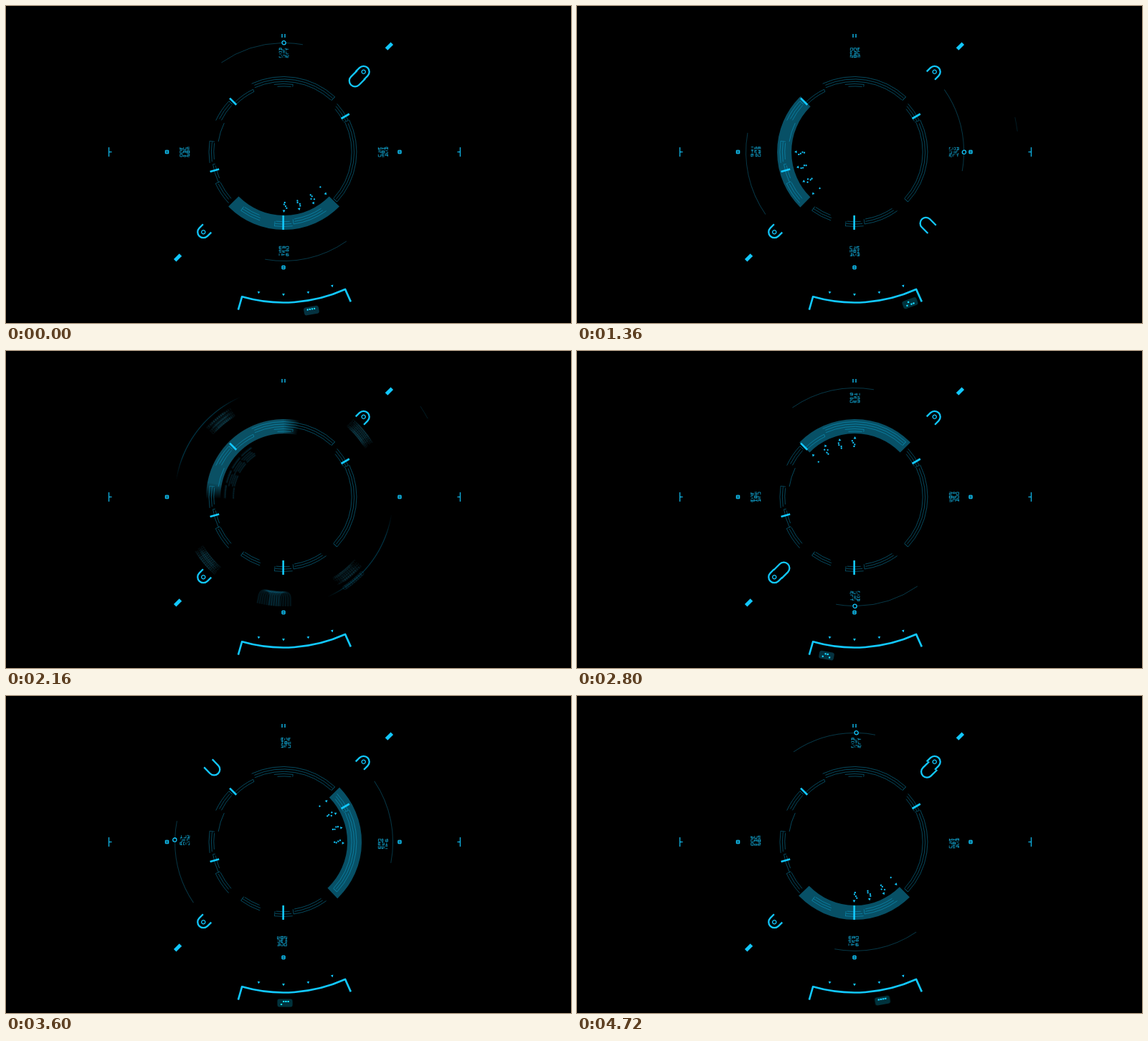
An HTML page with a canvas that plays this animation: 788 px wide and 442 px high, repeating every 4760 ms.

```html
<!DOCTYPE html>
<html lang="en">
<head>
<meta charset="utf-8">
<title>HUD dial</title>
<style>
  html, body { margin: 0; width: 100%; height: 100%; overflow: hidden; background: #000; }
  canvas { display: block; }
</style>
</head>
<body>
<canvas id="stage" width="788" height="442"></canvas>
<script>
const ctx = document.getElementById('stage').getContext('2d');
const CX = 387, CY = 203.5, LOOP = 4760, FRAME = 40, STEP = 1160;
const CYAN = '#12c8ff';
const SHUTTER = 24, SAMPLES = 10;
const SWING_START = 615, SWING_TIME = 750, HOP_START = 876;
const rad = deg => deg * Math.PI / 180;

function seeded(seed) {
  return () => {
    seed = (seed + 0x6d2b79f5) | 0;
    let v = Math.imul(seed ^ seed >>> 15, 1 | seed);
    v ^= v + Math.imul(v ^ v >>> 7, 61 | v);
    return ((v ^ v >>> 14) >>> 0) / 2 ** 32;
  };
}

// ---- timing ----

// Symmetric bezier ease with a slight wind-up and overshoot.
function swing(x) {
  if (x <= 0) return 0;
  if (x >= 1) return 1;
  const bez = (u, p) => 3 * p * u * (1 - u) ** 2 + 3 * (1 - p) * u * u * (1 - u) + u ** 3;
  let lo = 0, hi = 1;
  for (let i = 0; i < 24; i++) {
    const mid = (lo + hi) / 2;
    if (bez(mid, 0.75) < x) lo = mid; else hi = mid;
  }
  return bez(lo, -0.15);
}

function spring(ms) {
  return ms <= 0 ? 0 : 1 - Math.exp(-ms / 150) * Math.cos(ms * 2 * Math.PI / 290);
}

function rotation(t) {
  let turns = 0;
  for (let k = 0; k < 4; k++) turns += swing((t - k * STEP - SWING_START) / SWING_TIME);
  return turns * 90;
}

function badgeAngle(t) {
  const hop = k => 10 * spring(t - k * STEP - HOP_START);
  return t < 2000 ? 80 - hop(0) : 100 - hop(2) - hop(3);
}

// ---- drawing helpers, all relative to the dial centre ----

function arc(r, from, to) {
  ctx.beginPath();
  ctx.arc(0, 0, r, rad(from), rad(to));
  ctx.stroke();
}

function line(x1, y1, x2, y2) {
  ctx.beginPath();
  ctx.moveTo(x1, y1);
  ctx.lineTo(x2, y2);
  ctx.stroke();
}

function circle(x, y, r) {
  ctx.beginPath();
  ctx.arc(x, y, r, 0, 2 * Math.PI);
  ctx.stroke();
}

// Runs draw with +x pointing outward at the given polar position.
function at(angle, r, draw) {
  ctx.save();
  ctx.rotate(rad(angle));
  ctx.translate(r, 0);
  draw();
  ctx.restore();
}

const spoke = (angle, r1, r2) => at(angle, r1, () => line(0, 0, r2 - r1, 0));

const dot = (x, y) => ctx.fillRect(x - 1, y - 1, 2, 2);

function arrow() {
  ctx.beginPath();
  ctx.moveTo(1.9, 0);
  ctx.lineTo(-1.4, -1.9);
  ctx.lineTo(-1.4, 1.9);
  ctx.fill();
}

// Half circle with two legs; outward is the side the curve faces.
function hook(leg, outward) {
  ctx.lineWidth = 2.3;
  ctx.beginPath();
  ctx.moveTo(-outward * leg, -8);
  ctx.lineTo(0, -8);
  ctx.arc(0, 0, 8, -Math.PI / 2, Math.PI / 2, outward < 0);
  ctx.lineTo(-outward * leg, 8);
  ctx.stroke();
}

// Segment-style character centred on x, y, with random strokes left out.
function glyph(x, y, size, random, density) {
  const h = size / 2;
  for (const k of [-1, 0, 1]) {
    if (random() < density) line(x - h, y + k * h, x + h, y + k * h);
  }
  for (const side of [-h, h]) {
    for (const end of [-h, h]) {
      if (random() < density) line(x + side, y, x + side, y + end);
    }
  }
}

function textBlock(x, y, seed) {
  const random = seeded(seed);
  ctx.lineWidth = 1.1;
  for (let i = 0; i < 9; i++) {
    glyph(x + (i % 3 - 1) * 4.9, y + (Math.floor(i / 3) - 1) * 4.9, 3.3, random, 0.62);
  }
}

// ---- fixed parts ----

// Concentric lines, the inner ones trimmed a little, closed at one end.
function section(from, to, outer, lines, random) {
  for (let i = 0; i < lines; i++) {
    const trim = i ? 3 * random() : 0;
    arc(outer - 3.4 * i, from + trim, to - trim / 2);
  }
  spoke(to, outer, outer - 3.4 * (lines - 1));
}

function drawRing() {
  const random = seeded(5);
  const draw = (from, to, outer, lines = 3) => section(from, to, outer, lines, random);
  ctx.globalAlpha = 0.36;
  ctx.lineWidth = 1;
  draw(54, 82, 101.5);
  draw(83, 97, 104);
  draw(109, 126, 101);
  draw(137, 155, 104.5);
  draw(155, 170, 100, 2);
  draw(171.5, 188.5, 104);
  draw(189, 206, 92, 1);
  draw(205, 223, 104);
  draw(225, 244, 97, 2);
  draw(245, 313, 105);
  draw(262, 278, 95, 2);
  draw(318, 334, 100.5);
  draw(334, 403, 102);
  ctx.globalAlpha = 1;
}

function drawFixed() {
  ctx.strokeStyle = ctx.fillStyle = CYAN;
  drawRing();

  ctx.lineWidth = 2.6;
  spoke(90.2, 88.5, 108.5);
  for (const angle of [165, 225, 330]) spoke(angle, 93, 106);

  arc(210, 65.8, 106);
  spoke(65.8, 209, 229);
  spoke(106, 209, 229);
  for (let a = 70; a <= 100; a += 10) at(a, 199, arrow);

  for (const angle of [-45, 135]) {
    at(angle, 158, () => {
      hook(7.5, 1);
      ctx.lineWidth = 1.3;
      circle(0, 0, 2.6);
    });
    at(angle, 209, () => {
      ctx.lineWidth = 5;
      line(-6, 0, 5, 0);
    });
  }

  ctx.lineWidth = 1.3;
  glyph(-162.5, 0, 4.2, seeded(1), 1);
  glyph(162, 0, 4.2, seeded(8), 0.85);
  glyph(0, 161, 4.2, seeded(3), 0.85);
  for (const x of [-2, 2]) line(x, -164.5, x, -159.5);
}

function drawFlicker() {
  ctx.strokeStyle = CYAN;
  ctx.globalAlpha = 0.85;
  ctx.lineWidth = 1.4;
  for (const side of [-1, 1]) {
    const x = 1.5 + side * 245;
    line(x, -6.5, x, 6.5);
    line(x, 0, x - side * 4, 0);
  }
  ctx.globalAlpha = 1;
}

// ---- turning parts ----

function drawPointers() {
  const random = seeded(12);
  for (let i = 0; i < 4; i++) {
    at(90 - 15 * i, 82.5, () => {
      const count = i < 3 ? 4 : 1;
      for (let j = 0; j < count; j++) dot(-12 + 2.6 * j, -4 * random());
      arrow();
    });
  }
}

function drawTurning(turn, weight) {
  const alpha = a => { ctx.globalAlpha = a * weight; };
  ctx.save();
  ctx.translate(0.6, 0);
  ctx.rotate(rad(turn));
  ctx.strokeStyle = ctx.fillStyle = CYAN;

  alpha(0.4);
  ctx.lineWidth = 20;
  arc(98.5, 44.5, 135.5);

  alpha(1);
  drawPointers();

  alpha(0.27);
  ctx.lineWidth = 1;
  arc(152, 235, 268.8);
  arc(152, 271.2, 280);
  arc(152, 55, 100);

  alpha(0.55);
  for (let i = 0; i < 4; i++) {
    const a = rad(90 * i);
    textBlock(138.3 * Math.cos(a), 138.3 * Math.sin(a), 20 + i);
  }

  alpha(1);
  ctx.lineWidth = 1.3;
  circle(0, -152.3, 2.6);
  at(-45, 140.3, () => hook(12, -1));
  ctx.restore();
  ctx.globalAlpha = 1;
}

function drawBadge(angle, t, weight) {
  const random = seeded(Math.floor((t - HOP_START) / STEP + 1) % 4);
  at(angle, 224.5, () => {
    ctx.rotate(-Math.PI / 2);
    ctx.fillStyle = CYAN;
    ctx.globalAlpha = 0.25 * weight;
    ctx.beginPath();
    ctx.roundRect(-10.5, -5.5, 21, 11, 3);
    ctx.fill();
    ctx.globalAlpha = weight;
    for (let x = -5; x < 5; x += 3.2) dot(x, random() < 0.5 ? -2 : 2);
  });
  ctx.globalAlpha = 1;
}

// Averages several moments of the open shutter when something moves visibly.
function blurred(value, t, threshold, draw) {
  const start = t - SHUTTER / 2;
  const moved = Math.abs(value(start + SHUTTER) - value(start));
  const n = moved > threshold ? SAMPLES : 1;
  ctx.globalCompositeOperation = 'lighter';
  for (let i = 0; i < n; i++) draw(value(start + SHUTTER * (i + 0.5) / n), 1 / n);
  ctx.globalCompositeOperation = 'source-over';
}

// Faint line passing along the far right.
function drawPasser(t) {
  const angle = -9.7 - 21.3 * (t - 1360) / 800;
  ctx.strokeStyle = CYAN;
  ctx.globalAlpha = 0.14;
  ctx.lineWidth = 1;
  arc(229, angle - 2.5, angle + 2.5);
  ctx.globalAlpha = 1;
}

function render(t) {
  ctx.setTransform(1, 0, 0, 1, 0, 0);
  ctx.fillStyle = '#000';
  ctx.fillRect(0, 0, 788, 442);
  ctx.translate(CX, CY);

  blurred(rotation, t, 0.6, drawTurning);
  if (t < 1900 || t >= 2320) {
    blurred(badgeAngle, t, 0.1, (angle, weight) => drawBadge(angle, t, weight));
  }
  if (t >= 1240 && t < 2280) drawPasser(t);
  drawFixed();
  if (Math.round(t / FRAME) % 2 === 0) drawFlicker();
}

const begin = performance.now();
function tick() {
  const elapsed = (performance.now() - begin) % LOOP;
  render(Math.floor(elapsed / FRAME) * FRAME);
  requestAnimationFrame(tick);
}
tick();
</script>
</body>
</html>
```
